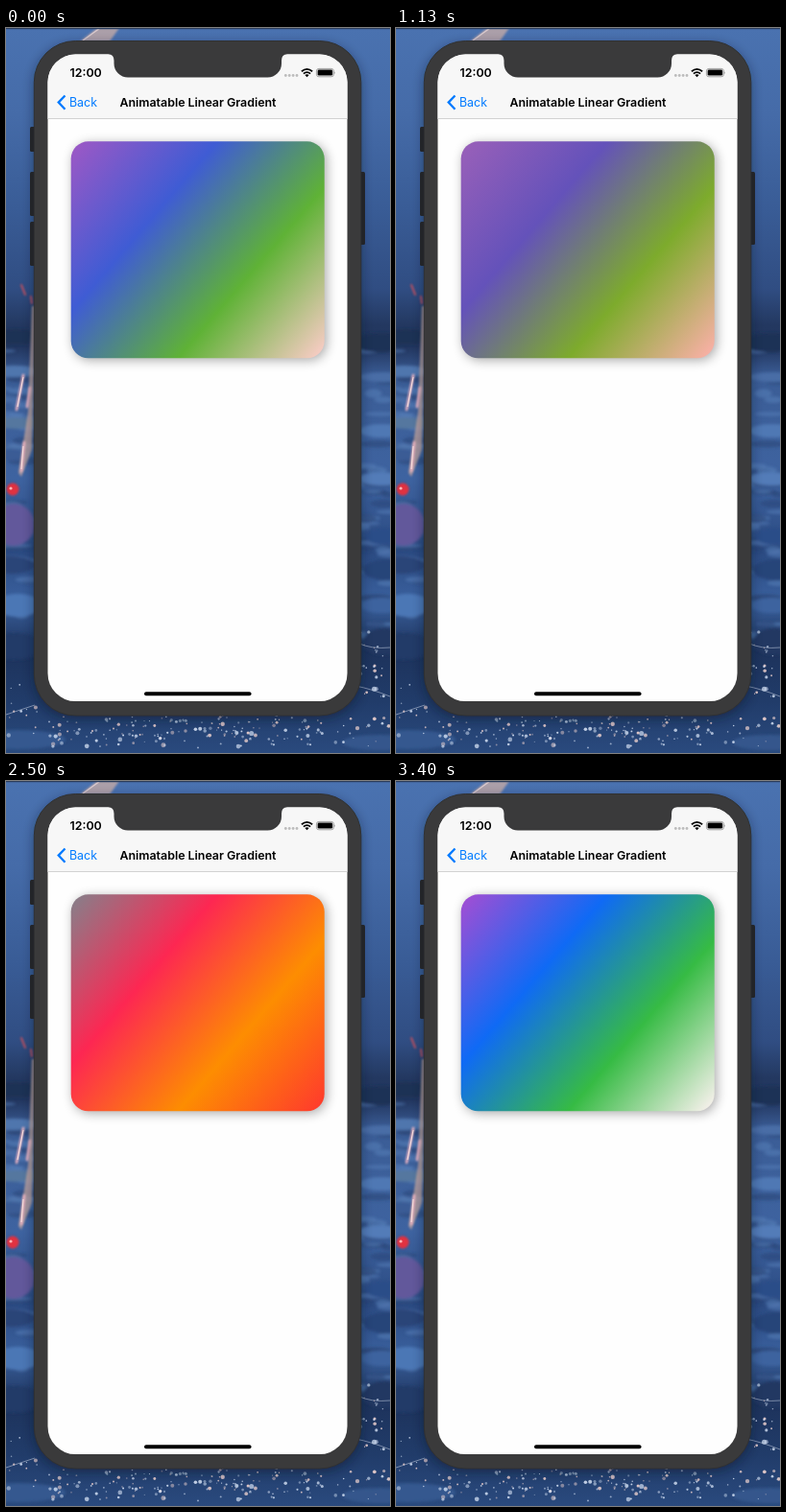
An HTML page for the animation above (3430 ms loop, 400 px wide and 756 px high).

```html
<!DOCTYPE html>
<html lang="en">
<head>
<meta charset="utf-8">
<title>Animatable Linear Gradient</title>
<style>
  html, body { margin: 0; width: 100%; height: 100%; overflow: hidden; background: #2c4777; }
  svg { display: block; width: 400px; height: 756px; }
  text { font-family: Inter, Roboto, sans-serif; font-size: 12.4px; }
</style>
</head>
<body>
<svg viewBox="0 0 400 756" xmlns="http://www.w3.org/2000/svg">
  <defs>
    <linearGradient id="sky" x2="0" y2="1">
      <stop offset="0" stop-color="#4a72b0"/>
      <stop offset=".12" stop-color="#456ba8"/>
      <stop offset=".25" stop-color="#395c96"/>
      <stop offset=".36" stop-color="#304d82"/>
      <stop offset=".41" stop-color="#233860"/>
      <stop offset=".44" stop-color="#22365f"/>
      <stop offset=".48" stop-color="#3b5d96"/>
      <stop offset=".62" stop-color="#3e63a0"/>
      <stop offset=".72" stop-color="#2b4a81"/>
      <stop offset=".79" stop-color="#3a609d"/>
      <stop offset=".86" stop-color="#1d335c"/>
      <stop offset=".93" stop-color="#213c6a"/>
      <stop offset="1" stop-color="#2a4a7e"/>
    </linearGradient>
    <linearGradient id="fill" gradientUnits="userSpaceOnUse" x1="68" y1="118" x2="332" y2="344">
      <stop offset="0"/>
      <stop offset=".3333"/>
      <stop offset=".6667"/>
      <stop offset="1"/>
    </linearGradient>
    <filter id="soft" x="-10%" y="-10%" width="120%" height="120%"><feGaussianBlur stdDeviation="1.6"/></filter>
    <filter id="glow" x="-100%" y="-100%" width="300%" height="300%"><feGaussianBlur stdDeviation="1.1"/></filter>
    <filter id="shade" x="-20%" y="-20%" width="140%" height="140%"><feGaussianBlur stdDeviation="6"/></filter>
    <clipPath id="screen"><rect x="43.500" y="27.500" width="312" height="674.600" rx="29"/></clipPath>
  </defs>

  <rect width="400" height="756" fill="url(#sky)"/>
  <g id="clouds" filter="url(#soft)"></g>
  <path d="M77 14 95 0H118L108 14Z" fill="#bda7a8" opacity=".85" filter="url(#glow)"/>
  <path d="M80 13 98 0" stroke="#f0dcdc" stroke-width="1.500" opacity=".7"/>
  <path d="M27 290H31L27 440 16 468 13 464 23 400Z" fill="#c4a59f" opacity=".75" filter="url(#glow)"/>
  <g fill="none" stroke-linecap="round" filter="url(#glow)">
    <path d="M18 362 11 398M19 432 16 462M25 375 22 395" stroke="#f2b6c4" stroke-width="2.5"/>
    <path d="M16 268 20 278M26 280 27 287" stroke="#c0505f" stroke-width="2"/>
  </g>
  <path d="M18 364 12 395M18 436 16 460" stroke="#ffe6e2"/>
  <circle cx="7" cy="481" r="6.5" fill="#e0303f" filter="url(#glow)"/>
  <circle cx="5" cy="480" r="1.6" fill="#ffb4b4"/>
  <path d="M366 641Q380 648 400 646M364 686Q380 689 400 697M0 716 30 706" fill="none" stroke="#a9b5cc" opacity=".65"/>
  <g id="lights"></g>
  <rect width="400" height="1.2" fill="#2b3d5c"/>

  <rect x="29" y="17" width="341" height="704" rx="42" fill="#0a1428" opacity=".45" filter="url(#shade)"/>
  <g fill="#222428">
    <rect x="25" y="103" width="8" height="26" rx="1.5"/>
    <rect x="25" y="150" width="8" height="46" rx="1.5"/>
    <rect x="25" y="202" width="8" height="46" rx="1.5"/>
    <rect x="366" y="150" width="8" height="76" rx="1.5"/>
  </g>
  <rect x="29.300" y="13.500" width="340.500" height="703.500" rx="43" fill="#3a3a3b" stroke="#303132"/>

  <g clip-path="url(#screen)">
    <rect x="43" y="27" width="313" height="676" fill="#fefefe"/>
    <rect x="43" y="27" width="313" height="67.500" fill="#f7f7f7"/>
    <rect x="43" y="94" width="313" height="1" fill="#d2d2d2"/>
  </g>
  <path d="M106.500 27Q112.500 27.500 112.500 34V37A14.500 14.500 0 0 0 127 51.500H272.500A14.500 14.500 0 0 0 287 37V34Q287 27.500 293 27Z" fill="#3a3a3b"/>

  <text x="66.500" y="51" font-weight="600" fill="#000">12:00</text>
  <g fill="#bcbcbc">
    <circle cx="291.300" cy="49.500" r="1.4"/>
    <circle cx="295.200" cy="49.500" r="1.4"/>
    <circle cx="299.100" cy="49.500" r="1.4"/>
    <circle cx="303" cy="49.500" r="1.4"/>
  </g>
  <path d="M307.900 45.200Q313.500 40.500 319.100 45.200M309.900 47.600Q313.500 44.700 317.100 47.600" fill="none" stroke="#000" stroke-width="1.800"/>
  <path d="M311.400 49Q313.500 47.500 315.600 49L313.500 51.200Z"/>
  <rect x="323.400" y="42.400" width="18" height="8.400" rx="2.500" fill="none" stroke="#8c8c8c" stroke-width=".8"/>
  <rect x="324.600" y="43.600" width="15.600" height="6" rx="1.400"/>
  <path d="M342.300 45.200Q343.700 46.600 342.300 48Z" fill="#8c8c8c"/>

  <path d="M61.500 70.500 54.700 77.600 61.500 84.700" fill="none" stroke="#007aff" stroke-width="2.300"/>
  <text x="66" y="82" fill="#007aff">Back</text>
  <text x="200" y="82" font-weight="600" text-anchor="middle" fill="#000">Animatable Linear Gradient</text>

  <rect x="70" y="120.500" width="264" height="226" rx="18" opacity=".33" filter="url(#shade)"/>
  <rect x="67.700" y="118.300" width="264" height="226" rx="18" fill="url(#fill)"/>
  <rect x="144" y="692.300" width="111.500" height="4" rx="2"/>
</svg>
<script>
const NS = 'http://www.w3.org/2000/svg';
const $ = id => document.getElementById(id);

function add(parent, tag, attrs) {
  const el = document.createElementNS(NS, tag);
  for (const k in attrs) el.setAttribute(k, attrs[k]);
  parent.appendChild(el);
}

let seed = 7;
const rand = () => (seed = (seed * 16807) % 2147483647) / 2147483647;

// Small wisps down both sides, then the larger banks: x, y, rx, ry, colour
for (let i = 0; i < 90; i++) {
  add($('clouds'), 'ellipse', {
    cx: i % 2 ? 368 + rand() * 36 : rand() * 32 - 4,
    cy: 335 + rand() * 300,
    rx: 8 + rand() * 14,
    ry: 1.5 + rand() * 3,
    fill: rand() < 0.5 ? '#587fb8' : '#2a4576',
    opacity: 0.55
  });
}
[
  [10, 322, 30, 8, '#1f3055'], [392, 328, 34, 10, '#1e3157'],
  [8, 358, 26, 6, '#5076ad'], [394, 364, 26, 5, '#486da6'],
  [10, 412, 24, 6, '#54779f'], [392, 420, 24, 7, '#4f78b4'],
  [4, 445, 20, 6, '#3b5c95'], [392, 470, 24, 7, '#527bb8'],
  [8, 518, 22, 22, '#62599b'], [394, 530, 20, 9, '#2c4d88'],
  [6, 560, 24, 9, '#2c4578'], [396, 565, 24, 11, '#274579'],
  [12, 602, 24, 12, '#4c77b5'], [392, 602, 22, 8, '#3c639f'],
  [8, 645, 30, 14, '#203a68'], [394, 640, 22, 14, '#203862'],
  [12, 742, 50, 10, '#35598f'], [390, 745, 40, 8, '#34578c']
].forEach(([cx, cy, rx, ry, fill]) => add($('clouds'), 'ellipse', { cx, cy, rx, ry, fill }));

function scatter(count, x, y, w, h) {
  for (let i = 0; i < count; i++) {
    add($('lights'), 'circle', {
      cx: (x + rand() * w).toFixed(1),
      cy: (y + (rand() + rand()) / 2 * h).toFixed(1),
      r: (0.6 + rand() * rand() * 2.2).toFixed(2),
      fill: rand() < 0.4 ? '#f0d3cf' : '#cfdcf0',
      opacity: (0.4 + rand() * 0.55).toFixed(2)
    });
  }
}
scatter(170, 45, 712, 285, 40);
scatter(25, 310, 705, 90, 50);
scatter(28, 366, 615, 34, 100);
scatter(14, 0, 670, 34, 86);

const LOOP = 3430, STEP = 100 / 3;
const cool = [[168, 74, 216], [0, 110, 255], [42, 190, 72], [255, 255, 255]];
const warm = [[132, 130, 138], [255, 38, 80], [255, 141, 0], [255, 54, 44]];
const stops = document.querySelectorAll('#fill stop');

// cubic-bezier(.42, 0, .58, 1)
function easeInOut(x) {
  let lo = 0, hi = 1;
  for (let i = 0; i < 20; i++) {
    const u = (lo + hi) / 2, v = 1 - u;
    if (3 * v * v * u * 0.42 + 3 * v * u * u * 0.58 + u * u * u < x) lo = u;
    else hi = u;
  }
  return lo * lo * (3 - 2 * lo);
}

function draw(ms) {
  const t = Math.floor((ms % LOOP + 5) / STEP) * STEP;
  const lag = 85 * Math.max(0, 1 - t / 800);
  // One second each way, warmest at 570 ms
  const phase = (t - lag - 570 + 2000) / 1000 % 2;
  const mix = 1 - easeInOut(phase < 1 ? phase : 2 - phase);
  stops.forEach((stop, i) => {
    const rgb = cool[i].map((c, k) => Math.round(c + (warm[i][k] - c) * mix));
    stop.setAttribute('stop-color', `rgb(${rgb})`);
  });
}

let start;
function tick(now) {
  start ??= now;
  draw(now - start);
  requestAnimationFrame(tick);
}
draw(0);
requestAnimationFrame(tick);
</script>
</body>
</html>
```
